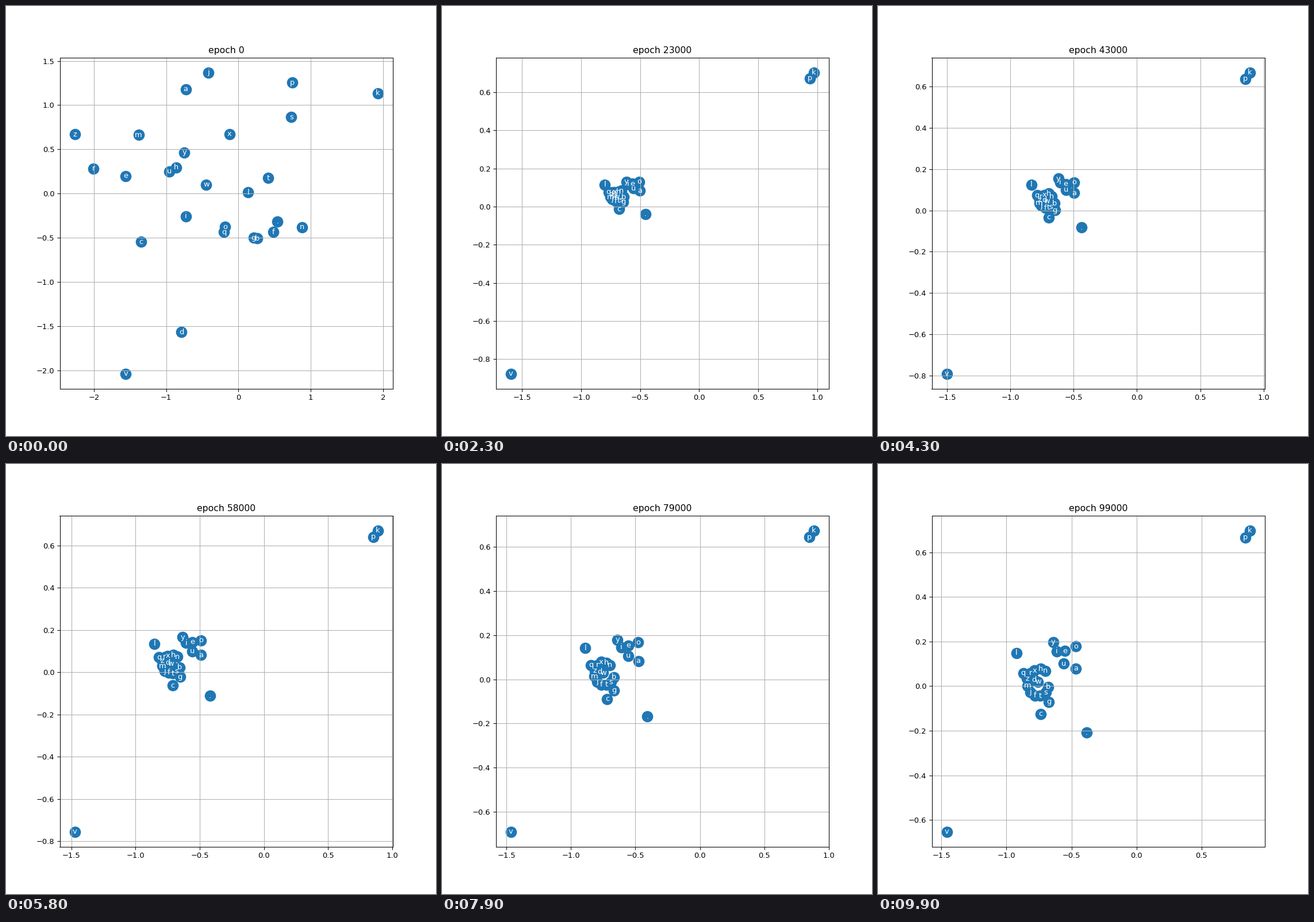
Write a matplotlib script that moves like this. It is 748 by 748 pixels and loops after 10000 ms.

```python
import numpy as np
import matplotlib.pyplot as plt
from matplotlib.animation import FuncAnimation

FRAMES = 100
SETTLED = 12                  # frame at which the random start has collapsed
TAU = 2.5                     # decay of the start, in frames
FOCUS = np.array([-0.58, 0.085])   # point the cluster spreads from
SPREAD = np.array([0.6, 0.35])     # its relative size when settled

START = {
    ".": (0.54, -0.315), "a": (-0.73, 1.18), "b": (0.26, -0.505), "c": (-1.345, -0.545),
    "d": (-0.79, -1.565), "e": (-1.56, 0.2), "f": (0.485, -0.435), "g": (0.21, -0.5),
    "h": (-0.86, 0.295), "i": (-0.73, -0.255), "j": (-0.415, 1.3675), "k": (1.9265, 1.135),
    "l": (0.135, 0.015), "m": (-1.38, 0.665), "n": (0.875, -0.38), "o": (-0.185, -0.375),
    "p": (0.745, 1.255), "q": (-0.2, -0.435), "r": (-2.005, 0.285), "s": (0.73, 0.865),
    "t": (0.41, 0.175), "u": (-0.96, 0.25), "v": (-1.56, -2.035), "w": (-0.445, 0.1),
    "x": (-0.125, 0.675), "y": (-0.75, 0.465), "z": (-2.261, 0.67),
}
CHARS = list(START)

# Final places: most consonants form a loose ring, the rest stand apart
final = {
    ".": (-0.386, -0.21), "a": (-0.468, 0.08), "e": (-0.553, 0.163), "i": (-0.613, 0.16),
    "o": (-0.467, 0.18), "u": (-0.555, 0.106), "y": (-0.643, 0.197), "l": (-0.917, 0.15),
    "q": (-0.873, 0.06), "c": (-0.737, -0.123), "g": (-0.672, -0.068),
    "d": (-0.79, 0.026), "w": (-0.763, 0.02),
}
for i, c in enumerate("nhxrzmjftsb"):
    a = np.radians(50 + 29 * i)
    final[c] = (-0.757 + 0.085 * np.cos(a), 0.017 + 0.06 * np.sin(a))

# The two far outliers set the axis limits
TIMES = [SETTLED, 23, 43, 58, 79, 99]
V_PATH = ([-1.6825, -1.595, -1.5015, -1.473, -1.465, -1.458],
          [-1.0545, -0.8757, -0.7911, -0.754, -0.6914, -0.6517])
K_PATH = ([0.9967, 0.9706, 0.8917, 0.8869, 0.8828, 0.871],
          [0.7026, 0.7025, 0.6673, 0.6695, 0.6745, 0.6968])
P_OFFSET = np.array([-0.035, -0.03])

start = np.array(list(START.values()))
jitter = np.random.default_rng(7).normal(0, 0.003, (FRAMES, len(CHARS), 2))
jitter[0] = 0


def along(path, frame):
    return np.array([np.interp(frame, TIMES, axis) for axis in path])


def drift(frame):
    """Slow training drift, without the influence of the start."""
    u = max(0, frame - SETTLED) / (FRAMES - 1 - SETTLED)
    size = SPREAD + (1 - SPREAD) * u
    v, k = along(V_PATH, frame), along(K_PATH, frame)
    far = {"v": v, "k": k, "p": k + P_OFFSET}
    return np.array([
        far[c] if c in far else FOCUS + size * (final[c] - FOCUS) + jitter[frame, i]
        for i, c in enumerate(CHARS)])


def pose(frame):
    base = drift(frame)
    return base + (start - base) * np.exp(-frame / TAU)


def limits(v):
    lo, hi = v.min(), v.max()
    pad = 0.05 * (hi - lo)
    return lo - pad, hi + pad


fig, ax = plt.subplots(figsize=(8, 8), dpi=93.5)
points = ax.scatter(*start.T, s=200, color="tab:blue")
labels = [ax.text(0, 0, c, ha="center", va="center", color="white") for c in CHARS]
title = ax.set_title("epoch 0")
ax.grid(True)


def update(frame):
    p = pose(frame)
    points.set_offsets(p)
    for label, xy in zip(labels, p):
        label.set_position(xy)
    ax.set_xlim(limits(p[:, 0]))
    ax.set_ylim(limits(p[:, 1]))
    title.set_text(f"epoch {frame * 1000}")
    return points, title, *labels


anim = FuncAnimation(fig, update, frames=FRAMES, interval=100, repeat=True,
                     repeat_delay=0, blit=False)
plt.show()
```
